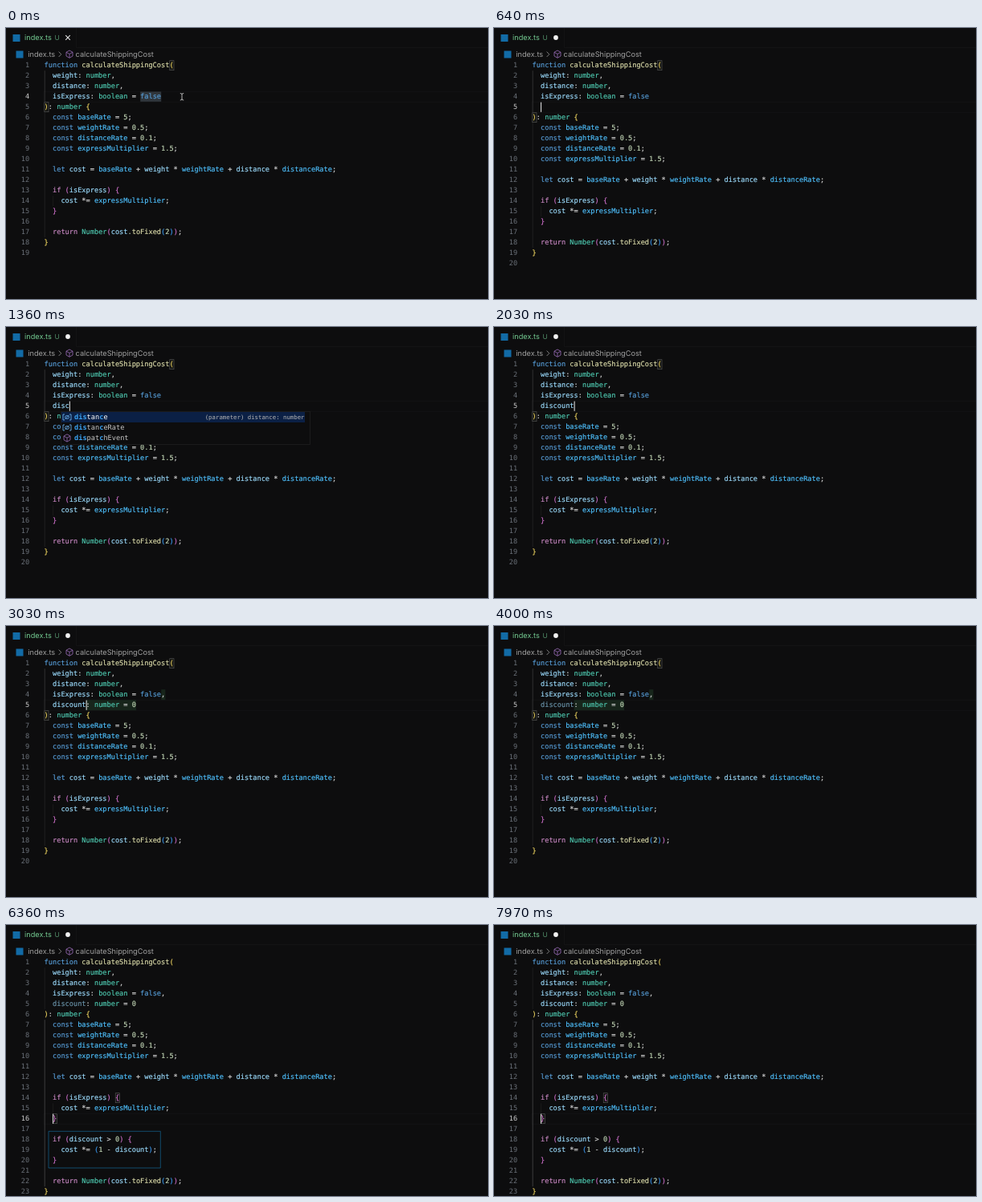
Recreate the animation shown at these times as an HTML page. Size 600 by 338 pixels, loop 8000 ms.

```html
<!DOCTYPE html>
<html lang="en">
<head>
<meta charset="utf-8">
<title>Editor with inline suggestions</title>
<style>
  html, body { margin: 0; width: 100%; height: 100%; overflow: hidden; background: #0d0d0e; }
  svg { display: block; width: 600px; height: 338px; }
  text { white-space: pre; text-rendering: geometricPrecision; font: 8.64px "DejaVu Sans Mono", monospace; }
  tspan { stroke-width: .16; }
  .ui { font: 9.2px Inter, "Open Sans", sans-serif; }
  .num { text-anchor: end; fill: #6a7078; }
  .ghost { font-style: italic; fill: #686868; }
  .match { fill: #3ba4f5; font-weight: bold; }
  .detail { font-size: 7.35px; text-anchor: end; fill: #b4b4b4; }
</style>
</head>
<body>
<svg viewBox="0 0 600 338">
  <rect width="600" height="338" fill="#0d0d0e"/>
  <path d="M87.5 0V24.5H600" fill="none" stroke="#131314"/>
  <rect x="8.5" y="8" width="9" height="9" fill="#126ba6"/>
  <rect x="12.5" y="28.5" width="9" height="9" fill="#126ba6"/>
  <text class="ui" x="23" y="15.3" fill="#73c991">index.ts</text>
  <text class="ui" x="60.5" y="15" fill="#4f8a66" style="font-size:8.4px">U</text>
  <text class="ui" x="27.3" y="36" fill="#a0a0a0">index.ts</text>
  <path d="M65.6 29.6l3.2 3.2-3.2 3.2" fill="none" stroke="#888" stroke-width=".9"/>
  <text class="ui" x="86.6" y="36" fill="#a0a0a0">calculateShippingCost</text>
  <g id="scene"></g>
</svg>
<script>
const LOOP = 8000, LEFT = 47.6, TOP = 40.2, CHAR = 5.2, ROW = 13;
const ENTER = 500, OFFER = 2700, ACCEPT = 3400, UNUSED = 3700;
const PREVIEW = 4600, OUTLINE = 5050, APPLY = 5950, RESOLVED = 6900;
const KEYS = [800, 960, 1130, 1290, 1420, 1560, 1700, 1860];

const scene = document.getElementById('scene');
const col = n => LEFT + n * CHAR;
const rowTop = n => TOP + n * ROW;
const base = n => rowTop(n) + 9.2;
const clamp = v => Math.max(0, Math.min(1, v));

const rect = (x, y, w, h, attrs) => `<rect x="${x}" y="${y}" width="${w}" height="${h}" ${attrs}/>`;
const text = (x, y, body, attrs = '') => `<text x="${x}" y="${y}" ${attrs}>${body}</text>`;
const path = (d, stroke, width = 1, attrs = '') =>
  `<path d="${d}" fill="none" stroke="${stroke}" stroke-width="${width}" ${attrs}/>`;
const span = (body, color) => `<tspan fill="${color}" stroke="${color}">${body}</tspan>`;

const palette = {};
const paint = (color, words) => words.split(' ').forEach(word => palette[word] = color);
paint('#569cd6', 'function const let false');
paint('#c586c0', 'if return');
paint('#4ec9b0', 'number boolean Number');
paint('#dcdcaa', 'calculateShippingCost toFixed');
paint('#4fc1ff', 'baseRate weightRate distanceRate expressMultiplier');
const BRACKETS = ['#f2d862', '#cf70cb', '#3a9bf5'];

function highlighter() {
  let depth = 0;
  return (line, dim) => line.replace(/[\d.]*\d|\w+|[(){}]|[^\w(){}]+/g, token => {
    if (/[({]/.test(token)) return span(token, BRACKETS[depth++ % 3]);
    if (/[)}]/.test(token)) return span(token, BRACKETS[--depth % 3]);
    if (/^[\d.]+$/.test(token)) return span(token, '#c2d6b6');
    if (!/\w/.test(token)) return span(token, '#d4d4d4');
    return span(token, palette[token] || (dim && token === 'discount' ? '#6b95ab' : '#9cdcfe'));
  });
}

const body = `  const baseRate = 5;
  const weightRate = 0.5;
  const distanceRate = 0.1;
  const expressMultiplier = 1.5;

  let cost = baseRate + weight * weightRate + distance * distanceRate;

  if (isExpress) {
    cost *= expressMultiplier;`.split('\n');
const discountBlock = ['  }', '', '  if (discount > 0) {', '    cost *= (1 - discount);'];
const ending = ['  }', '', '  return Number(cost.toFixed(2));', '}', ''];

function codeLines(t) {
  const typed = KEYS.filter(k => t >= k).length;
  const offered = t >= OFFER;
  const lines = ['function calculateShippingCost(', '  weight: number,', '  distance: number,',
    '  isExpress: boolean = false' + (offered ? ',' : '')];
  if (t >= ENTER) lines.push('  ' + 'discount'.slice(0, typed) + (offered ? ': number = 0' : ''));
  lines.push('): number {', ...body);
  const block = t < PREVIEW ? [] : discountBlock.map(line => ({ line, ghost: t < APPLY }));
  return [...lines.map(line => ({ line })), ...block, ...ending.map(line => ({ line }))];
}

function cube(x, y) {
  return path(`M${x} ${y - 4.7}l4 2.2v4.8l-4 2.3-4-2.3v-4.8zM${x - 4} ${y - 2.4}l4 2.1 4-2.1M${x} ${y - .3}v4.8`, '#9a6cb8', .8);
}

function variableIcon(x, y) {
  return path(`M${x - 3} ${y - 3.5}h-2v7h2M${x + 3} ${y - 3.5}h2v7h-2M${x - 2.5} ${y + 2.2}l5-4.6`, '#6aaee8', .9)
    + `<ellipse cx="${x}" cy="${y}" rx="2.5" ry="1.9" fill="none" stroke="#6aaee8" stroke-width=".9"/>`;
}

const snippetIcon = (x, y) => rect(x - 4, y - 4, 8, 8, 'fill="none" stroke="#ccc" stroke-width=".9"');

const suggestions = [
  ['distance', variableIcon, '(parameter) distance: number'], ['distanceRate', variableIcon],
  ['dispatchEvent', cube], ['devicePixelRatio', variableIcon], ['DOMImplementation', variableIcon],
  ['decodeURI', cube], ['dowhile', snippetIcon, 'Do-While Statement'], ['DeviceMotionEvent', variableIcon],
  ['DeviceOrientationEvent', variableIcon], ['decodeURIComponent', cube],
  ['DOMPoint', variableIcon], ['DOMPointReadOnly', variableIcon]
];

// Marks the query letters found in order, or returns null when one is missing.
function fuzzy(name, query) {
  let found = 0;
  const marked = [...name].map(c =>
    c.toLowerCase() === query[found] ? (found++, `<tspan class="match">${c}</tspan>`) : c).join('');
  return found === query.length ? marked : null;
}

function popup(query) {
  const hits = suggestions.map(([name, icon, detail]) => ({ label: fuzzy(name, query), icon, detail }))
    .filter(hit => hit.label);
  if (!hits.length) return '';
  const top = 105.5, height = hits.length * ROW + 2;
  let out = rect(68.5, top, 310, height, 'fill="#0d0d0e" stroke="#1b1b1c"')
    + rect(69, top + .5, 303, ROW, 'fill="#0b2045"');
  if (hits.length === suggestions.length) out += rect(371.5, top + .5, 7, 51, 'fill="#2a2a2b"');
  hits.forEach(({ label, icon, detail }, i) => {
    const y = top + 7 + i * ROW;
    out += icon(76, y) + text(85, y + 2.6, label, `fill="${i ? '#c8c8c8' : '#fff'}"`);
    if (detail) out += text(371.5, y + 2.5, detail, `class="detail" opacity="${i ? .75 : 1}"`);
  });
  return out;
}

function caretAt(t) {
  if (t < ENTER) return { row: 3, column: 28, since: -600 };
  if (t >= APPLY) return { row: 15, column: 2, since: APPLY };
  if (t >= ACCEPT) return { row: 4, column: 22, since: ACCEPT };
  const past = KEYS.filter(k => t >= k);
  return { row: 4, column: 2 + past.length, since: past.length ? past[past.length - 1] : ENTER };
}

const bracketBox = (row, column) =>
  rect(col(column) + .2, rowTop(row) + .5, CHAR, 12, 'fill="#121312" stroke="#5c5c5c" stroke-width=".6"');

function backdrop(t) {
  const close = t < ENTER ? 4 : 5, applied = t >= APPLY;
  const last = close + (t < PREVIEW ? 13 : 17);
  const guide = (x, from, to, color) => path(`M${x} ${rowTop(from)}V${rowTop(to)}`, color, .8);
  let out = rect(47, rowTop(caretAt(t).row), 560, ROW, 'fill="none" stroke="#151516" stroke-width=".8"')
    + guide(48.2, 1, close, applied ? '#222' : '#3c3c3c')
    + guide(48.2, close + 1, last, applied ? '#4a4a4a' : '#272727')
    + guide(58.5, close + 9, close + 10, '#1e1e1e');
  if (applied) out += bracketBox(13, 17) + bracketBox(15, 2);
  else out += bracketBox(0, 30) + bracketBox(close, 0);
  if (t < ENTER) out += rect(col(23), rowTop(3) + .2, CHAR * 5, 12.4, 'fill="#30363c"');
  if (t >= OFFER && !applied) {
    out += rect(col(28), rowTop(3), CHAR, ROW, 'fill="#17251b"')
      + rect(col(10), rowTop(4), CHAR * 12, ROW, 'fill="#17251b"');
  }
  return out;
}

function outline(t) {
  if (t < OUTLINE || t > 6620) return '';
  const drawn = clamp((t - OUTLINE) / 700) * 100;
  const applied = t >= APPLY;
  const opacity = applied ? .85 - .75 * clamp((t - 6150) / 450) : 1;
  return path('M53 257.3H192.3V303H53Z', applied ? '#1689c8' : '#2b90e4', applied ? 1 : 1.5,
    `pathLength="100" stroke-dasharray="${drawn} 101" opacity="${opacity}"`);
}

function render(t) {
  const caret = caretAt(t);
  const paintLine = highlighter();
  const dim = t >= UNUSED && t < RESOLVED;
  let out = cube(79, 32.7) + backdrop(t), number = 0;

  codeLines(t).forEach(({ line, ghost }, row) => {
    const code = line.trimStart(), x = col(line.length - code.length);
    if (ghost) return out += text(x, base(row), code, 'class="ghost"');
    const active = row === caret.row ? 'style="fill:#ccc"' : '';
    out += text(29.2, base(row), ++number, `class="num" ${active}`)
      + text(x, base(row), paintLine(code, dim && row === 4));
  });

  out += t < ENTER
    ? path('M74.2 9.2l5.6 5.6M79.8 9.2l-5.6 5.6', '#e4e4e4', 1.1)
      + path('M216.8 81.5q2.2 0 2.2 1.3 0-1.3 2.2-1.3M219 82.5V89M216.8 90q2.2 0 2.2-1.3 0 1.3 2.2 1.3', '#c8c8c8', .9)
    : '<circle cx="77" cy="12" r="2.9" fill="#f0f0f0"/>';

  if (t >= PREVIEW && t < APPLY) {
    out += rect(69.5, 289.3, 33.2, 10.2, 'rx="2.5" fill="#111" stroke="#74754a" stroke-width=".9"')
      + text(74.3, 297.2, '⇥ tab', 'fill="#b8b8b8" style="font-size:8px"');
  }
  out += outline(t);
  if ((t - caret.since) % 1000 < 500) {
    out += rect(col(caret.column), rowTop(caret.row) + .4, 1.1, 12.2, 'fill="#d8d8d8"');
  }
  const typed = KEYS.filter(k => t >= k).length;
  if (typed && typed < 8) out += popup('discount'.slice(0, typed));
  return out;
}

let shown = '';
function frame() {
  const next = render(performance.now() % LOOP);
  if (next !== shown) scene.innerHTML = shown = next;
  requestAnimationFrame(frame);
}
frame();
</script>
</body>
</html>
```
